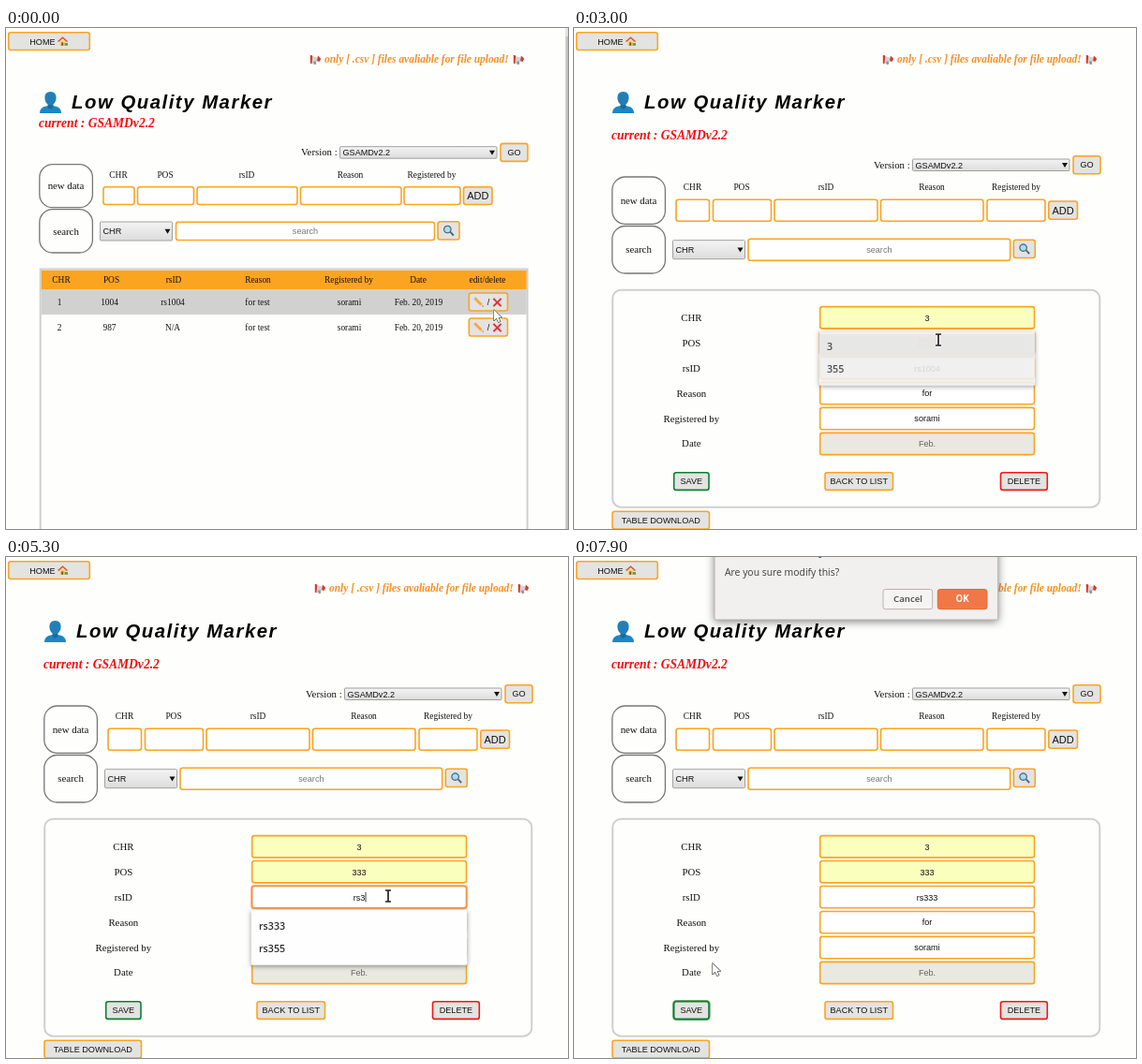
An HTML page with a canvas that plays this animation: 600 by 535 pixels, repeating every 8000 ms.

```html
<!DOCTYPE html>
<html lang="en">
<head>
<meta charset="utf-8">
<title>Low Quality Marker</title>
<style>
html, body { margin: 0; width: 100%; height: 100%; overflow: hidden; background: #fefefc; }
canvas { display: block; }
</style>
</head>
<body>
<canvas id="stage" width="600" height="535"></canvas>
<script>
const ctx = document.getElementById('stage').getContext('2d');
const LOOP = 8000, OPEN_FORM = 500;
const ORANGE = '#fba420', GREY = '#e3e3e2', INK = '#111', YELLOW = '#faffbd';
const SERIF = '"Liberation Serif", serif', SANS = '"Liberation Sans", sans-serif', UI = '"Open Sans", sans-serif';
const body = `10.8px ${SERIF}`, small = `9.4px ${SERIF}`, control = `9.1px ${SANS}`;
const USER = 'sorami';

// Icons live on a 16-unit grid.
const ICONS = {
  house: [['#f3d27a', 'M3 7h10v8H3z'], ['#d7592f', 'M0 8L8 1l8 7-1.500 1.500L8 4 1.500 9.500z'],
    ['#8a4b2a', 'M6 10h3v5H6z'], ['#6a9c3a', 'M11 11h5v4h-5z']],
  horn: [['#cfd3d4', 'M1 3L13 6 10 11 3 14z'], ['#d6382c', 'M1 2l3 1-1 11-2-1zM11 3l4 4-2 4-3-1z'], ['#8d9295', 'M5 11l3-1 1 4-3 1z']],
  person: [['#1c86c4', 'M0 16c0-4 3-5.500 8-5.500s8 1.500 8 5.500z'], ['#186b9c', 'M6 8h4v4l-2 1-2-1z'],
    ['#217fb8', 'M8 0c3 0 4.500 2 4.200 5S10 10 8 10 4 8 3.800 5 5 0 8 0z']],
  pencil: [['#f5a93b', 'M4 1l9 9-3 3-9-9z'], ['#e98b8b', 'M1 4l3-3-1.500-1L0 2.500z'], ['#e8c9a0', 'M13 10l2 5-5-2z'], ['#444', 'M14 13l1 2-2-1z']],
  cross: [['#e0303a', 'M3 1l5 5 5-5 2 2-5 5 5 5-2 2-5-5-5 5-2-2 5-5-5-5z']],
  lens: [['#50616b', 'M9 10l1.500-1.500L16 14l-2 2z'], ['#45606e', 'M6 0a6 6 0 1 0 .1 0z'], ['#a7dcf5', 'M6 1.500a4.500 4.500 0 1 0 .1 0z']]
};

function icon(name, x, y, size) {
  ctx.save();
  ctx.translate(x, y);
  ctx.scale(size / 16, size / 16);
  for (const [color, path] of ICONS[name]) {
    ctx.fillStyle = color;
    ctx.fill(new Path2D(path));
  }
  ctx.restore();
}

function text(str, x, y, font = control, color = INK, align = 'center') {
  ctx.font = font;
  ctx.fillStyle = color;
  ctx.textAlign = align;
  ctx.fillText(str, x, y);
}

function box(x1, y1, x2, y2, fill, stroke, radius = 2.5, width = 1.6) {
  ctx.beginPath();
  ctx.roundRect(x1, y1, x2 - x1, y2 - y1, radius);
  if (fill) { ctx.fillStyle = fill; ctx.fill(); }
  if (stroke) { ctx.strokeStyle = stroke; ctx.lineWidth = width; ctx.stroke(); }
}

function button(label, x1, y1, x2, y2, stroke = ORANGE, font = control) {
  box(x1, y1, x2, y2, GREY, stroke);
  text(label, (x1 + x2) / 2, (y1 + y2) / 2 + parseFloat(font) * .36, font);
}

function select(label, x1, y1, x2, y2) {
  const shade = ctx.createLinearGradient(0, y1, 0, y2);
  shade.addColorStop(0, '#f4f4f4');
  shade.addColorStop(1, '#dcdcdc');
  box(x1, y1, x2, y2, shade, '#a0a0a0', 1, 1);
  const mid = (y1 + y2) / 2;
  text(label, x1 + 3, mid + 3.3, control, INK, 'left');
  ctx.beginPath();
  ctx.moveTo(x2 - 8, mid - 2.3);
  ctx.lineTo(x2 - 2, mid - 2.3);
  ctx.lineTo(x2 - 5, mid + 2.7);
  ctx.fill();
}

const HEADS = ['CHR', 'POS', 'rsID', 'Reason', 'Registered by'];
const LIST = {
  dx: 0, current: 105.5, version: 133, heads: [120, 170, 257, 367.5, 454.5], headY: 160,
  inputs: [104, 137, 140.5, 200.5, 204, 311, 314.5, 422, 425, 485], inY: [169.7, 188.5],
  add: [488.5, 169.7, 519, 188.5], tabs: [145.7, 191.7, 193.7, 240], tabText: [172, 220.5],
  selY: 207, search: [181.5, 207.3, 457.5, 226.5], lens: [461, 206.7, 484, 226]
};
const FORM = {
  dx: 5, current: 119, version: 146.3, heads: [126.5, 179, 269, 382, 472], headY: 173,
  inputs: [109, 144.5, 148.5, 210.5, 214, 324, 327.5, 437, 441, 503], inY: [183.3, 206.2],
  add: [506.8, 185, 537.5, 204.3], tabs: [159, 209.3, 211.5, 262], tabText: [187.5, 240],
  selY: 226.7, search: [186, 225.2, 465.7, 248.2], lens: [469.3, 226.3, 492.3, 245.5]
};

function header(p) {
  const { dx } = p;
  button('', 2.7, 4.7, 89.3, 23.5);
  text('HOME', 25.3, 17.6, control, INK, 'left');
  icon('house', 55, 8.5, 11);
  icon('horn', 324 + dx, 27, 13);
  icon('horn', 541 + dx, 27, 13);
  text('only [ .csv ] files avaliable for file upload!', 340 + dx, 37, `italic bold 11.45px ${SERIF}`, '#f58f2a', 'left');
  icon('person', 36 + dx, 68, 23);
  ctx.letterSpacing = '1.55px';
  text('Low Quality Marker', 70 + dx, 86.3, `italic bold 20.3px ${SANS}`, '#000', 'left');
  ctx.letterSpacing = '0px';
  text('current : GSAMDv2.2', 35 + dx, p.current, `italic bold 13.55px ${SERIF}`, '#f40d0d', 'left');

  text('Version :', 315 + dx, p.version + 3.3, body, INK, 'left');
  select('GSAMDv2.2', 356.5 + dx, p.version - 6.3, 524 + dx, p.version + 6.2);
  button('GO', 528 + dx, p.version - 9.6, 557 + dx, p.version + 9.4);

  HEADS.forEach((h, i) => {
    text(h, p.heads[i], p.headY, small);
    box(p.inputs[2 * i], p.inY[0], p.inputs[2 * i + 1], p.inY[1], '#fff', ORANGE);
  });
  button('ADD', ...p.add, ORANGE, `11px ${SANS}`);

  ['new data', 'search'].forEach((label, i) => {
    box(35.8 + dx, p.tabs[2 * i], 92.4 + dx, p.tabs[2 * i + 1], null, '#777', 14, 1.3);
    text(label, 64 + dx, p.tabText[i], body);
  });
  select('CHR', 100.5 + dx, p.selY, 177.5 + dx, p.selY + 20);
  box(...p.search, '#fff', ORANGE);
  text('search', (p.search[0] + p.search[2]) / 2, (p.search[1] + p.search[3]) / 2 + 3.3, control, '#777');
  button('', ...p.lens);
  icon('lens', p.lens[0] + 6, p.lens[1] + 4, 11.5);
}

function listPage() {
  header(LIST);
  const cols = [57, 110.5, 178, 268.5, 366.5, 440.5];
  const heads = [...HEADS, 'Date', 'edit/delete'], headX = [59, 112.5, 179, 269, 366, 440, 514];
  box(36.7, 257.5, 556.6, 560, null, '#cfcfcf', 0, 2);
  box(37.7, 258.7, 555.7, 279, ORANGE, null, 0);
  box(37.7, 279, 555.7, 306, '#d1d1cf', null, 0);
  heads.forEach((h, i) => text(h, headX[i], 271.6, small));
  [['1', '1004', 'rs1004'], ['2', '987', 'N/A']].forEach((row, r) => {
    const y = 27 * r;
    [...row, 'for test', USER, 'Feb. 20, 2019'].forEach((s, i) => text(s, cols[i], 295.6 + y, small));
    button('/', 494.3, 283 + y, 535.5, 302 + y);
    icon('pencil', 499.5, 287.5 + y, 11);
    icon('cross', 519, 287.5 + y, 11);
  });
  box(597, 0, 600, 535, '#e4e4e2', null, 0);
  box(597.7, 9, 600, 535, '#c2c2c0', null, 0);
}

// Field values as [time, text]; the first entry is the stored value.
const VALUES = [
  [[0, '1'], [1800, '3']],
  [[0, '1004'], [3500, '3'], [3700, '33'], [3900, '333']],
  [[0, 'rs1004'], [4900, 'r'], [5000, 'rs'], [5300, 'rs3'], [5500, 'rs33'], [5700, 'rs333']],
  [[0, 'for']], [[0, USER]], [[0, 'Feb.']]
];
const FILLED = [2700, 3900];
const FOCUS = [[0, -1], [1300, 0], [2900, 1], [4300, 2], [6300, -1]];
const POPUPS = [
  { row: 0, from: 1300, to: 1800, rise: 200, fall: 360, items: ['1', '1004', '11111', '12', '12111', '133'] },
  { row: 0, from: 2200, to: 2940, rise: 200, fall: 360, items: ['3', '355'], pick: 2700 },
  { row: 1, from: 3500, to: 3700, rise: 200, fall: 0, items: ['333', '3333', '355'] },
  { row: 1, from: 3700, to: 4040, rise: 0, fall: 360, items: ['333', '3333'], pick: 3900 },
  { row: 2, from: 4900, to: 5300, rise: 300, fall: 0, items: ['rs1004', 'rs111', 'rs12', 'rs1234', 'rs333', 'rs355'] },
  { row: 2, from: 5300, to: 5500, rise: 0, fall: 0, items: ['rs333', 'rs355'] },
  { row: 2, from: 5500, to: 6300, rise: 0, fall: 360, items: ['rs333'] }
];
const latest = (steps, t) => steps.findLast(s => s[0] <= t);

function field(row, t) {
  const y = 297.6 + 26.95 * row, value = latest(VALUES[row], t)[1];
  const focused = latest(FOCUS, t)[1] === row, filled = t >= FILLED[row];
  const disabled = row === 5;
  if (focused) box(262.5, y, 491.6, y + 23.4, null, 'rgba(240,130,70,.55)', 2.5, 3);
  box(262.7, y, 491.5, y + 23.3, disabled ? '#e9e9e2' : filled ? YELLOW : '#fff', focused ? '#f79445' : ORANGE);
  ctx.font = control;
  const half = ctx.measureText(value).width / 2;
  const selected = focused && value === VALUES[row][0][1];
  if (selected) box(377 - half, y + 6.7, 377 + half, y + 17.3, '#ee7a5a', null, 0);
  text(value, 377, y + 15, control, selected ? '#fde4da' : disabled ? '#666' : INK);
  if (focused && !selected && !filled) box(377.3 + half, y + 6.5, 378.1 + half, y + 17, INK, null, 0);
}

function popup({ row, from, to, rise, fall, items, pick }, t) {
  if (t < from) return;
  const fadeIn = rise ? (t - from + 100) / rise : 1;
  const fadeOut = t < to ? 1 : fall ? 1 - (t - to) / fall : 0;
  const alpha = Math.min(1, fadeIn, fadeOut);
  if (alpha <= 0) return;
  const top = 322.8 + 26.95 * row, step = 24.25;
  ctx.save();
  ctx.globalAlpha = alpha;
  ctx.save();
  ctx.shadowColor = 'rgba(0,0,0,.4)';
  ctx.shadowBlur = 5;
  ctx.shadowOffsetY = 1.5;
  box(261.7, top, 492.3, top + step * items.length + 10.5, '#fefefe', null, 1);
  ctx.restore();
  if (t >= pick) box(261.7, top + 4, 492.3, top + 4 + step, '#e6e6e4', null, 0);
  items.forEach((s, i) => text(s, 270, top + 21 + step * i, `600 10.7px ${UI}`, '#2c2c2c', 'left'));
  ctx.restore();
}

function formPage(t) {
  header(FORM);
  box(41.2, 279.7, 561.3, 511.7, null, '#cfcfcf', 9, 2);
  [...HEADS, 'Date'].forEach((label, row) => {
    text(label, 125.3, 312.7 + 26.95 * row, body);
    field(row, t);
  });
  if (t >= 7400) box(106.5, 474.5, 144.2, 493.6, null, '#67a873', 3, 3);
  button('SAVE', 106.7, 474.7, 144, 493.4, '#0c8030');
  button('BACK TO LIST', 268, 474.7, 340.5, 493.4);
  button('DELETE', 455.5, 474.7, 505.3, 493.4, '#f01818');
  button('TABLE DOWNLOAD', 41, 516.2, 144.5, 535);
  POPUPS.forEach(p => popup(p, t));
}

function dialog(t) {
  if (t < 7500) return;
  ctx.save();
  ctx.globalAlpha = Math.min(1, (t - 7400) / 300);
  ctx.save();
  ctx.shadowColor = 'rgba(0,0,0,.5)';
  ctx.shadowBlur = 10;
  ctx.shadowOffsetY = 2;
  box(150, -20, 452.7, 67, '#f1f0ee', null, 1);
  ctx.restore();
  box(150, -20, 452.7, 67, null, '#b5b3b0', 1, 1);
  text('localhost:8000 says', 161, -2, `bold 11.8px ${UI}`, '#3c3c3c', 'left');
  text('Are you sure modify this?', 161, 20.2, `10.4px ${UI}`, '#3c3c3c', 'left');
  box(330, 34.5, 382.7, 55.7, '#f5f4f3', '#b8b3ad', 2.5, 1);
  text('Cancel', 356.5, 48.4, `600 9.7px ${UI}`, '#4a4a4a');
  box(388.3, 34.5, 441, 55.7, '#f07746', '#e0683a', 2.5, 1);
  text('OK', 414.5, 48.4, `bold 9.7px ${UI}`, '#fff');
  ctx.restore();
}

const PATH = [
  [0, 521, 301], [400, 503, 292], [500, 502, 293], [900, 455, 304], [1300, 351, 305], [2600, 351, 305],
  [2900, 388, 331], [3000, 389, 333], [4000, 389, 333], [4300, 408, 362], [5800, 408, 362],
  [6200, 508, 399], [6300, 509, 400], [6700, 338, 403], [6800, 285, 414], [7000, 143, 462],
  [7200, 125, 478], [7800, 125, 478], [7900, 148, 434], [8000, 148, 434]
];

function pointer(t) {
  const i = PATH.findIndex(p => p[0] > t);
  const [t0, x0, y0] = PATH[i - 1], [t1, x1, y1] = PATH[i];
  const k = (t - t0) / (t1 - t0);
  const x = x0 + (x1 - x0) * k, y = y0 + (y1 - y0) * k;
  const beam = t >= OPEN_FORM && x > 262 && x < 492 && y > 297 && y < 456;
  const shape = new Path2D(beam
    ? 'M-3 -6H3M-3 6H3M0 -6V6'
    : 'M0 0V11.500L2.700 9 4.700 13.300 6.700 12.400 4.800 8.200H8.300Z');
  ctx.save();
  ctx.translate(x, y);
  ctx.lineJoin = 'round';
  ctx.strokeStyle = '#fff';
  ctx.lineWidth = beam ? 3.4 : 2.4;
  ctx.stroke(shape);
  ctx.strokeStyle = '#222';
  ctx.lineWidth = beam ? 1.7 : 1.1;
  ctx.stroke(shape);
  if (!beam) { ctx.fillStyle = '#fff'; ctx.fill(shape); }
  ctx.restore();
}

function draw(now) {
  const t = Math.floor(now % LOOP / 100) * 100;
  ctx.fillStyle = '#fefefc';
  ctx.fillRect(0, 0, 600, 535);
  if (t < OPEN_FORM) listPage();
  else formPage(t);
  dialog(t);
  pointer(t);
  requestAnimationFrame(draw);
}
requestAnimationFrame(draw);
</script>
</body>
</html>
```
